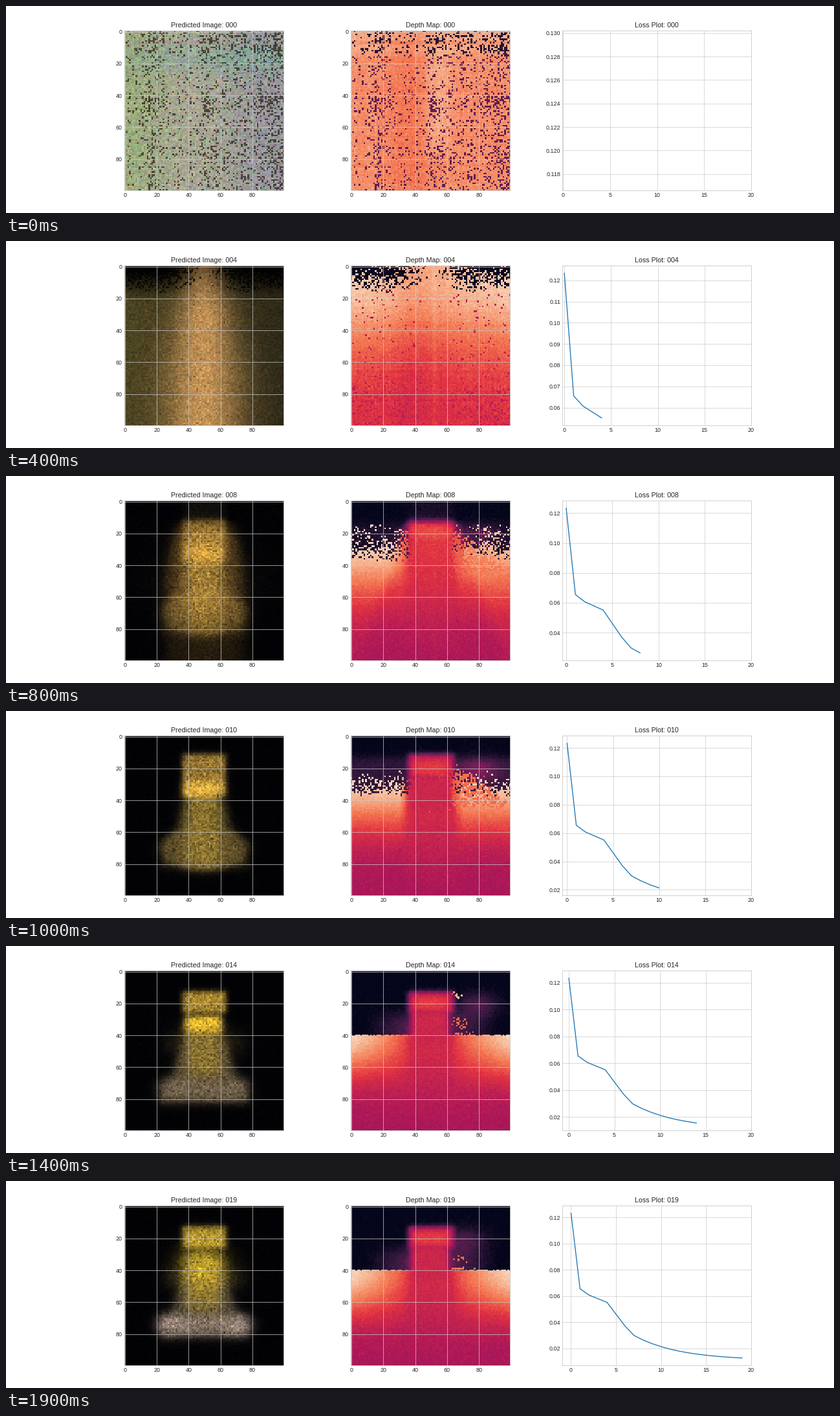
Write a matplotlib script that moves like this. It is 1280 by 320 pixels and loops after 2 s.

```python
import numpy as np
import matplotlib.pyplot as plt
from matplotlib.animation import FuncAnimation
from matplotlib.colors import LinearSegmentedColormap
from matplotlib.ticker import MultipleLocator

STEPS = 20
N = 100

plt.rcParams.update({
    "font.family": "Liberation Sans", "text.color": ".15",
    "axes.edgecolor": ".8", "axes.linewidth": 1, "axes.axisbelow": True,
    "axes.grid": True, "grid.color": ".8", "grid.linestyle": "-",
    "xtick.color": ".15", "ytick.color": ".15",
    "xtick.major.size": 0, "ytick.major.size": 0,
    "lines.solid_capstyle": "round",
})
ROCKET = LinearSegmentedColormap.from_list("rocket", [
    "#03051a", "#35193e", "#701f57", "#ad1759",
    "#e13342", "#f37651", "#f6b48f", "#faebdd"])

X, Y = np.meshgrid(np.arange(N, dtype=float), np.arange(N, dtype=float))
SIDE = np.abs(X - 50)
fixed = np.random.default_rng(4)
COL = fixed.normal(size=(1, N))
ROW = fixed.normal(size=(N, 1))


def loss(step):
    """A steep drop, a plateau and a second drop, then a slow decay."""
    early = np.interp(step, [0, 1, 2, 4, 6, 7],
                      [.1234, .0655, .0607, .0551, .037, .0298])
    late = .0109 + .0189 * np.exp(-(step - 7) / 5)
    return np.where(step < 7, early, late)


# Soft shapes on the pixel grid

def lerp(a, b, m):
    return a + (b - a) * m


def rise(v, a, b):
    return np.clip((v - a) / (b - a), 0, 1)


def bump(v, c, w):
    return np.exp(-((v - c) / w) ** 2)


def fall(start, width, hi, lo):
    """Value going down the picture from hi to lo."""
    return lerp(lo, hi, bump(np.maximum(Y, start), start, width))


def box(v, a, b, s=1.5):
    lo = np.clip((a - v) / s, -40, 40)
    hi = np.clip((v - b) / s, -40, 40)
    return 1 / ((1 + np.exp(lo)) * (1 + np.exp(hi)))


def part(x0, x1, y0, y1, s=1.5):
    return box(X, x0, x1, s) * box(Y, y0, y1, s)


def paint(back, *layers):
    rgb = np.ones((N, N, 3)) * back
    for mask, colour in layers:
        rgb = lerp(rgb, np.array(colour, float), mask[..., None])
    return rgb


def grain(rgb, n, light, chroma):
    return rgb * (1 + light * n["g"][..., None]) + chroma * n["c"]


# Training stages: each gives a colour image and a depth map

def start(n):
    rgb = paint((156, 173, 124),
                (rise(X, 0, 85), (152, 151, 156)),
                (.6 * bump(X, 42, 24), (178, 172, 152)),
                (.75 * bump(Y, 17, 9) * rise(X, -40, 70), (130, 166, 152)),
                (.4 * bump(Y, 7, 1), (165, 140, 150)))
    rgb = grain(rgb, n, .05, 11)
    cols = (.08 + .08 * rise(X, 60, 72) + .04 * COL
            + .16 * sum(bump(X, c, 5) for c in (17, 52, 93)))
    rows = (1 + .25 * ROW - .3 * bump(Y, 26, 9)
            + .9 * sum(bump(Y, c, 2.5) for c in (5, 11, 44)))
    hole = n["u"] < cols * rows
    rgb[hole] = rgb[hole] * .35 + (18, 12, 4)
    depth = (.77 + .06 * box(Y, -9, 14) + .07 * part(47, 60, 12, 76, 2)
             - .05 * bump(X, 36, 14) - .05 * bump(Y, 7, 1)
             + .008 * (COL + ROW) + .022 * n["g"])
    return rgb, np.where(hole, lerp(.1, .25, rise(Y, 12, 18)), depth)


def warm(n):
    glow = (bump(X, 52, 30) * bump(Y, 60, 38)
            + .25 * bump(X, 50.5, 1.2) * rise(Y, 0, 50)
            - .2 * box(Y, -9, 9, 2) + .04 * (COL + ROW))
    rgb = paint((152, 72, 9), (glow, (206, 107, 20)))
    top = box(Y, -9, 13)
    depth = (fall(0, 60, .53, .475) + .13 * top + .06 * top * bump(X, 52, 8)
             + .17 * bump(X, 51.5, 1.6) + .08 * bump(X, 55, 4.5)
             + .05 * box(X, 86, 130, 3) - .13 * bump(Y, 7, .8)
             + .008 * (COL + ROW) + .028 * n["g"])
    p = .007 + .11 * part(44, 130, 2, 6, .6) + .03 * box(X, 86, 130, 3)
    hole = lerp(.05, .24, rise(Y, 8, 20))
    return grain(rgb, n, .05, 3), np.where(n["u"] < p, hole, depth)


def column(n):
    core = bump(X, 49, 12 + 12 * rise(Y, 0, 70))
    rgb = paint((76, 68, 34), (X / N, (46, 41, 24)))
    rgb = rgb * lerp(.08, 1, rise(Y, 2, 22))[..., None]
    rgb = paint(rgb, (core * lerp(.5, .96, rise(Y, 0, 28)), (200, 150, 88)))
    rgb = grain(rgb, n, .09, 3)
    depth = (fall(8, 42, .86, .555) + .06 * rise(SIDE, 8, 45) * (1 - Y / N)
             - .05 * bump(X, 42, 18) * (1 - Y / 150)
             + .04 * bump(X, 52, 1.5) - .02 * bump(X, 35, 4)
             + .006 * (COL + ROW) + .02 * n["g"])
    outside = rise(SIDE, 2, 24)
    hole = n["u"] < .88 * outside * (1 - rise(Y, 3, 17))
    rgb[hole] *= .3
    depth = np.where(hole, .05 * n["u2"], depth)
    low = .04 * outside + .13 * outside * rise(Y, 72, 80)
    return rgb, np.where(n["u2"] < low * rise(Y, 10, 20), .47, depth)


def blob(n):
    half = 13 + 12 * np.sqrt(rise(Y, 11, 50))
    light = (.86 * rise(Y, 0, 24) - .5 * rise(Y, 64, 88)
             + .12 * bump(Y, 27, 9)) * (.7 + .3 * bump(X, 50, 17))
    body = box(X, 50 - half, 50 + half, 2.2) * box(Y, 12, 130, .8)
    rgb = paint((2, 2, 5),
                (.35 * part(4, 96, 35, 62, 5), (24, 28, 18)),
                (part(37, 63, -9, 12, 1), (30, 26, 18)),
                (body, (0, 0, 0)))
    rgb = rgb + (body * light)[..., None] * np.array([214, 157, 68])
    far = (fall(15, 48, .96, .46)
           - .09 * box(X, 66, 130, 3) * bump(Y, 36, 18))
    p = .36 * rise(Y, 14, 18) + .64 * rise(Y, 26, 39 - 4 * (X > 50))
    sky = .12 * part(36, 63, -9, 14, 2) + .08 * part(20, 80, 22, 45, 4)
    depth = np.where(n["u"] < p, far, sky)
    reach = half + .4 * np.maximum(Y - 45, 0)
    mask = box(X, 50 - reach, 50 + reach, 1.6) * box(Y, 13, 140, .9)
    near = fall(12, 55, .66, .42) + .025 * bump(X, 52, 1.5)
    return grain(rgb, n, .15, 2), lerp(depth, near, mask) + .016 * n["g"]


def standing(n, form=0, finish=0):
    """Upright shape on the ground: first forming, then getting crisp."""
    rough = 1 - form

    def shade(first, formed, final):
        colour = lerp(np.array(first), np.array(formed), form)
        return lerp(colour, np.array(final), finish)

    base = shade((96, 79, 42), (124, 107, 84), (148, 129, 114))
    oval = np.hypot((X - 49.5) / 27, (Y - 70) / 13.5)
    half = 13 + 15 * rise(Y, 38, 82) ** 1.4
    skirt = box(X, 49.5 - half, 49.5 + half) * box(Y, 42, 82)
    feet = bump(SIDE, 21, 8) * box(Y, 70, 79)
    body_end = lerp(82, 65, form)
    neck_end = 38 + 9 * finish
    rgb = paint((2, 2, 5),
                (.8 * form * part(25, 75, 39, 51, 2.5), (38, 33, 20)),
                (skirt, shade((52, 45, 26), (80, 68, 48), (74, 65, 50))),
                (rough * box(oval, -1, 1, .07), base),
                (.85 * form * part(21, 77, 68, 79, 1.8), base),
                (.6 * finish * feet, (178, 154, 145)),
                (.9 * part(38, 60, 30, body_end, 2), (146, 121, 50)),
                (part(36, 63, 12.5 - 1.5 * rough, 26 + 11 * rough, .9),
                 shade((150, 117, 50), (168, 135, 48), (176, 147, 50))),
                (part(37.5, 60, 28, neck_end, 1 + 3 * finish),
                 shade((222, 174, 64), (230, 185, 48), (214, 180, 43))))

    # Ground plane, with a horizon that turns from scattered to sharp
    far = fall(lerp(24, 38, form) + 2 * finish, lerp(32, 26, form), .95, .42)
    wide = lerp(rise(SIDE, 13, 20), rise(SIDE, 13, 50) ** .7, form)
    ground = lerp(fall(40, 45, .53, .4), far, wide)
    edge = Y >= 39.5 + finish / 2 + (n["row"] > .65)
    seen = n["u"] < lerp(rise(Y, 19, 38) ** 2, edge, form)
    haze = box(Y, 27, 60, 2.5) * (1 - rise(SIDE, 12, 42))
    sky = (rough * .13 * box(Y, 13, 50) + .25 * haze * form
           + .2 * bump(X, 79 - 8 * finish, 13) * bump(Y, 21, 8))
    depth = np.where(seen, ground, sky)

    # Stray points right of the shape fade as it forms
    slope = box(X, 58, 66 + 1.3 * (Y - 18), 2) * box(Y, 19, 44, 1)
    loose = (.7 * rough * slope + .5 * form * part(63, 77, 38, 40, .5)
             + form * part(64, 71, 30, 35, .8) * lerp(.65, .25, finish))
    depth = np.where(n["u2"] < loose, .7, depth)
    spark = .3 * form * (1 - finish) * part(64, 69, 12, 17, .5)
    depth = np.where(n["u2"] < spark, .94, depth)

    depth = lerp(depth, .51, part(36 + form, 63 - 2 * form, 25, 46, .9))
    depth = lerp(depth, .5, part(35.5, 64, 12.5 - 1.5 * rough, 26, .9))
    depth = depth + .1 * part(39, 60, 16, 25)
    return grain(rgb, n, .15, 1.5), depth + .014 * n["g"]


STAGES = [(0, start), (1, warm), (4, column), (6, blob), (10, standing)]


def render(step):
    rng = np.random.default_rng(50 + step)
    n = {"g": rng.normal(size=(N, N)), "c": rng.normal(size=(N, N, 3)),
         "u": rng.random((N, N)), "u2": rng.random((N, N)),
         "row": rng.random((1, N))}
    at, stage = [s for s in STAGES if s[0] <= step][-1]
    later = [s for s in STAGES if s[0] > step]
    if not later:
        rgb, depth = stage(n, rise(step, 10, 14), rise(step, 14, 19))
    else:
        end, after = later[0]
        t = (step - at) / (end - at)
        rgb, depth = stage(n)
        rgb2, depth2 = after(n)
        rgb = lerp(rgb, rgb2, t)
        # Large depth gaps flip pixel by pixel, small ones blend
        flip = np.where(rng.random((N, N)) < t, depth2, depth)
        depth = np.where(np.abs(depth2 - depth) > .3, flip,
                         lerp(depth, depth2, t))
    return np.clip(rgb, 0, 255) / 255, np.clip(depth, 0, 1)


fig, (pred_ax, depth_ax, loss_ax) = plt.subplots(1, 3, figsize=(20, 5), dpi=64)
pred_im = pred_ax.imshow(np.zeros((N, N, 3)), interpolation="nearest")
depth_im = depth_ax.imshow(np.zeros((N, N)), cmap=ROCKET, vmin=0, vmax=1,
                           interpolation="nearest")
loss_line, = loss_ax.plot([], [], color="#1f77b4")
loss_ax.xaxis.set_major_locator(MultipleLocator(5))


def update(step):
    rgb, depth = render(step)
    pred_im.set_data(rgb)
    depth_im.set_data(depth)
    steps = np.arange(step + 1)
    loss_line.set_data(steps, loss(steps))
    loss_ax.set_xlim(-.05 * max(step, 1.1), 20)
    loss_ax.relim()
    loss_ax.autoscale_view(scalex=False)
    for ax, name in ((pred_ax, "Predicted Image"), (depth_ax, "Depth Map"),
                     (loss_ax, "Loss Plot")):
        ax.set_title(f"{name}: {step:03d}")
    return pred_im, depth_im, loss_line


anim = FuncAnimation(fig, update, frames=STEPS, interval=100,
                     init_func=lambda: update(0), repeat=True, repeat_delay=0)
plt.show()
```
